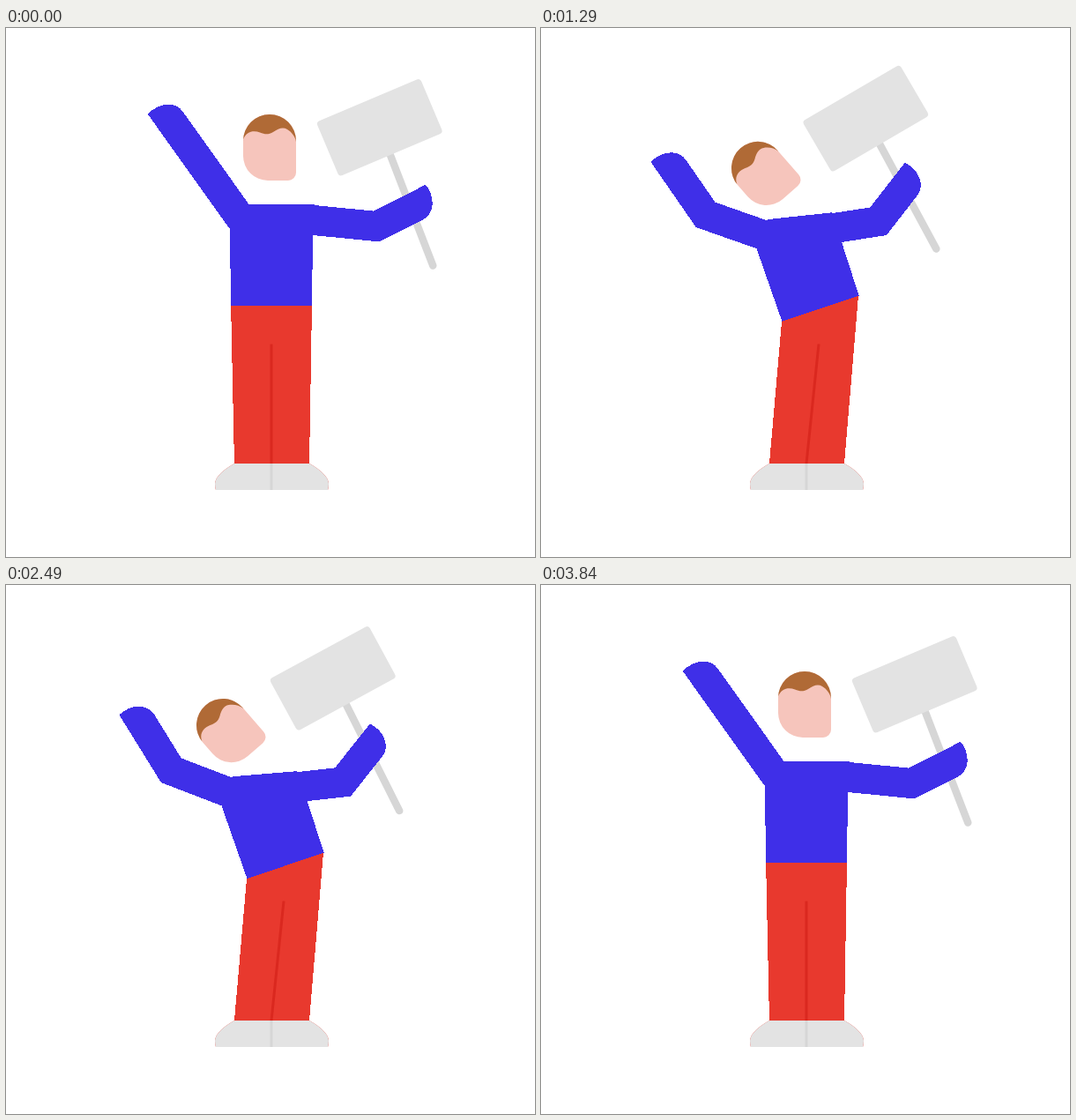
These frames come from a looping animation (600 by 600 pixels, 5.87 s). An HTML page without scripts:

```html
<!DOCTYPE html>
<html lang="en">
<head>
<meta charset="utf-8">
<title>Waving a sign</title>
<style>
/* lean: 0 upright, 1 fully left; flap: 0 arms wide, 1 arms bent */
@property --lean { syntax: "<number>"; inherits: true; initial-value: 0; }
@property --flap { syntax: "<number>"; inherits: true; initial-value: 0; }
/* Joint angles: left and right shoulder, left and right elbow, sign in hand */
@property --ls { syntax: "<angle>"; inherits: true; initial-value: 0deg; }
@property --le { syntax: "<angle>"; inherits: true; initial-value: 0deg; }
@property --rs { syntax: "<angle>"; inherits: true; initial-value: 0deg; }
@property --re { syntax: "<angle>"; inherits: true; initial-value: 0deg; }
@property --grip { syntax: "<angle>"; inherits: true; initial-value: 0deg; }

html, body { margin: 0; height: 100%; overflow: hidden; background: #fff; }

svg {
  --blue: #3f2fe8; --red: #e8392e; --crease: #da281f;
  --grey: #e3e3e3; --dark: #d6d6d6; --skin: #f6c5bc; --hair: #b06a36;
  display: block; width: 100%; height: 100%;
  animation: pose 5870ms infinite, flap 5870ms infinite;
  animation-timing-function: cubic-bezier(.37, 0, .63, 1);

  --tilt: calc(-18.6deg * max(var(--lean), .4 * var(--lean)));
  --dip: max(0, 16 * var(--lean) * (1 - var(--lean)));
  --duck: calc(var(--dip) + 10.5 * max(var(--lean), -1 * var(--lean)));
  --left-bend: calc(var(--le) + 16deg * var(--flap));
  --right-bend: calc(var(--re) - 22deg * var(--flap));
}

@keyframes pose {
  0%, 65.42%, 100% { --lean: 0; --ls: 54.5deg; --le: 0deg; --rs: 5.6deg; --re: -32.5deg; --grip: 3.9deg; }
  6.64%, 58.6% { --lean: -.28; --ls: 58deg; --le: 6.5deg; --rs: 3deg; --re: -4.8deg; --grip: 2deg; }
  10.22%, 54.17% { --lean: .32; --ls: 33.5deg; --le: 18deg; --rs: -8.8deg; --re: -15deg; --grip: 6.3deg; }
  16.01%, 49.4% { --lean: 1; --ls: 23deg; --le: 22.5deg; --rs: -14.4deg; --re: -25deg; --grip: 11deg; }
  6.64%, 49.4% { animation-timing-function: cubic-bezier(.33, 0, .67, .33); }
  10.22%, 54.17% { animation-timing-function: cubic-bezier(.33, .67, .67, 1); }
}
@keyframes flap {
  0%, 16.01%, 32.37%, 49.4%, 100% { --flap: 0; }
  24.19%, 40.89% { --flap: 1; }
}

.blue, .red { shape-rendering: crispEdges; }
.blue { fill: var(--blue); }
.red { fill: var(--red); }

#leg-l { transform: translate(301px, 494px) skewX(calc(-6.2deg * var(--lean))); }
#leg-r { transform: translate(301px, 494px) skewX(calc(-3.85deg * var(--lean))); }
#crease { transform: translate(301px, 494px) skewX(calc(-5.9deg * var(--lean))); }

#body {
  transform:
    translate(calc(301px + 16px * var(--lean)),
              calc(315px + 1px * var(--dip) + 1.5px * var(--lean) + 2px * var(--flap)))
    rotate(var(--tilt));
}
#head {
  transform:
    translate(-2px, calc(-149px + 1px * var(--duck)))
    rotate(calc(-41deg * var(--lean) - var(--tilt)))
    translate(0, -38px);
}

/* Each elbow is mitred by shearing both limb ends by half the bend */
#arm-l { transform: translate(-36px, -100.5px) rotate(calc(180deg + var(--ls) + 18deg * var(--flap))); }
#elbow-l { transform: translate(calc(71px - 3px * var(--lean)), 0); }
#elbow-l > rect { transform: skewX(calc(var(--left-bend) / -2)); }
#fore-l { transform: rotate(var(--left-bend)); }
#fore-l > rect { transform: skewX(calc(var(--left-bend) / 2)); }

#yoke { transform: translate(-25px, -115px) rotate(calc(15deg * var(--flap))); }
#arm-r { transform: translate(72px, 35px) rotate(calc(var(--rs) + 14deg * var(--flap))) translate(0, -17px); }
#elbow-r { transform: translate(calc(71px + 1px * min(25 * var(--lean), -8 * var(--lean)) - 11px * var(--flap)), 0); }
#elbow-r > rect { transform: skewX(calc(var(--right-bend) / -2)); }
#fore-r { transform: rotate(var(--right-bend)); }
#fore-r > rect { transform: skewX(calc(var(--right-bend) / 2)); }
#sign {
  transform:
    translate(44px, calc(-1px + 8px * var(--lean)))
    rotate(calc(var(--grip) + 13deg * var(--flap)));
}
</style>
</head>
<body>
<svg viewBox="0 0 600 600">
  <defs>
    <path id="shoes" d="M259 494H344C357 501 366 510 366 517Q366 521 365 524H238Q237 521 237 517C237 510 246 501 259 494Z"/>
    <path id="hand" d="M-40 17H0C14 17 24 0 20 -17H-40Z"/>
    <g id="upper"><circle r="17"/><rect y="-17" width="35" height="34"/></g>
  </defs>

  <path id="leg-l" class="red" d="M-42 1L-46.2 -194H20V1Z"/>
  <path id="leg-r" class="red" d="M-20 1V-192H46.2L43 1Z"/>
  <path id="crease" d="M0 0V-135.5" stroke="var(--crease)" stroke-width="3"/>
  <use href="#shoes" fill="var(--red)"/>
  <use href="#shoes" fill="var(--grey)"/>
  <path d="M301 494V524" stroke="var(--dark)" stroke-width="3"/>

  <g id="body">
    <path class="blue" d="M-25 -115L-47 -86L-46 0H46L47 -80Z"/>

    <g id="arm-l" class="blue">
      <use href="#upper"/>
      <g id="elbow-l">
        <rect x="-45" y="-17" width="45" height="34"/>
        <g id="fore-l">
          <rect y="-17" width="40" height="34"/>
          <use href="#hand" x="64.5"/>
        </g>
      </g>
    </g>

    <g id="yoke" class="blue">
      <rect width="74" height="35"/>
      <g id="arm-r">
        <use href="#upper"/>
        <g id="elbow-r">
          <rect x="-45" y="-17" width="45" height="34"/>
          <g id="fore-r">
            <g id="sign" shape-rendering="auto">
              <path d="M3 -90L-2.4 70" stroke="var(--dark)" stroke-width="8.5" stroke-linecap="round"/>
              <rect x="-60.8" y="-131.5" width="128" height="67" rx="4" fill="var(--grey)"/>
            </g>
            <rect y="-17" width="40" height="34"/>
            <use href="#hand" x="51"/>
          </g>
        </g>
      </g>
    </g>

    <g id="head">
      <path d="M-30 0A30 30 0 0 1 30 0V36A9 9 0 0 1 21 45H-2A28 28 0 0 1 -30 17Z" fill="var(--skin)"/>
      <path d="M-30 -1C-27 -11 -18 -12 -11 -9.5C-5 -7 -1 -7 4 -10C10 -14 15 -16 20 -13C25 -10 29 -5 30 1V0A30 30 0 0 0 -30 0Z" fill="var(--hair)"/>
    </g>
  </g>
</svg>
</body>
</html>
```
